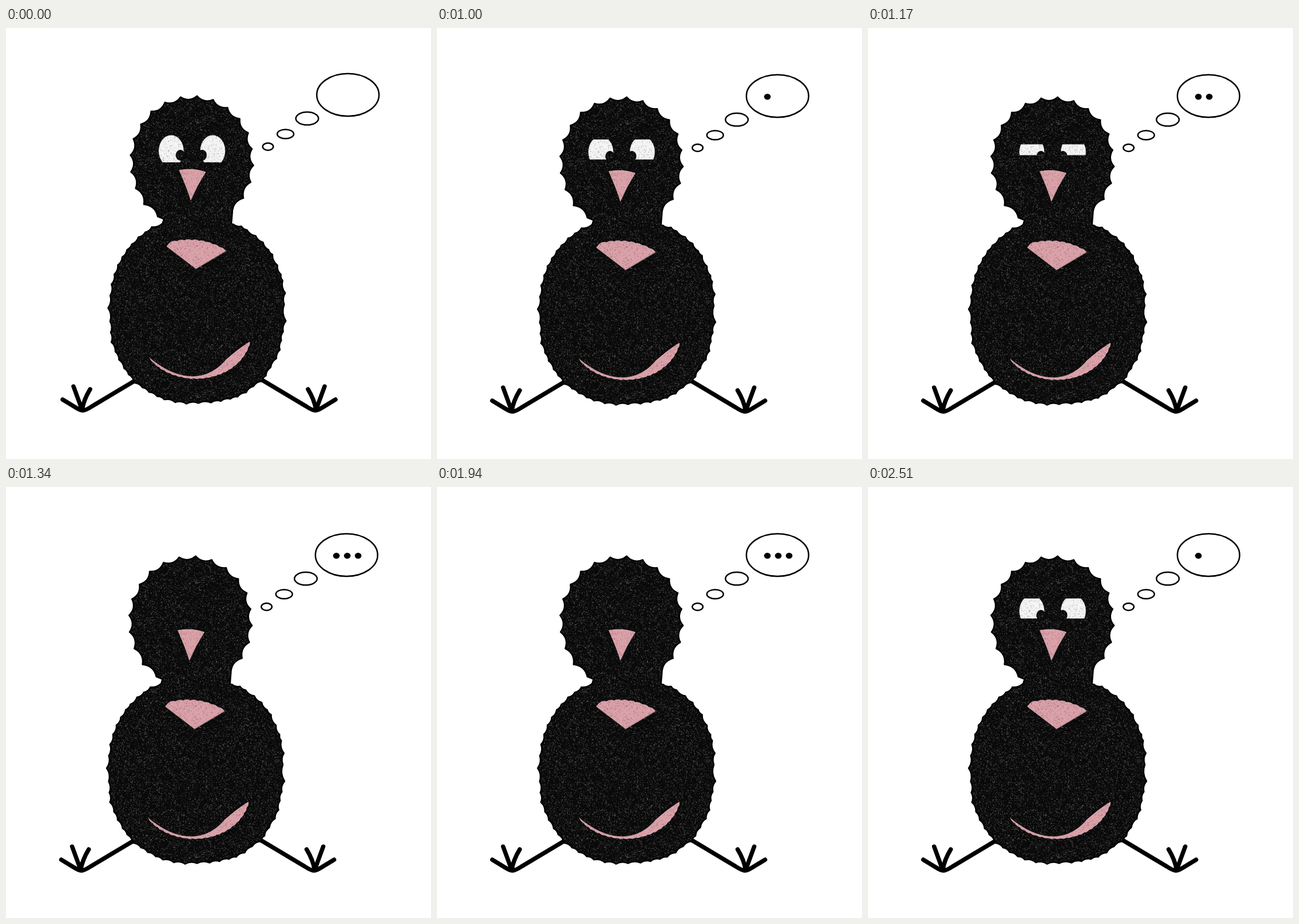
Animation, 743 px wide and 754 px high, one loop 2.68 s. Source, as an HTML page with a canvas:

```html
<!DOCTYPE html>
<html lang="en">
<head>
<meta charset="utf-8">
<title>Blinking chick</title>
<style>
  html, body { margin: 0; width: 100%; height: 100%; overflow: hidden; background: #fff; }
  canvas { display: block; }
</style>
</head>
<body>
<canvas id="stage" width="743" height="754"></canvas>
<script>
const ctx = document.getElementById('stage').getContext('2d');
ctx.imageSmoothingEnabled = false;
ctx.lineCap = ctx.lineJoin = 'round';

// [duration in ms, pose]; pose 0 is awake, pose 3 is asleep
const steps = [[1000, 0], [170, 1], [170, 2], [1000, 3], [170, 2], [170, 1]];
const loop = steps.reduce((sum, [ms]) => sum + ms, 0);

function seeded(seed) {
  return () => (seed = (seed * 16807) % 2147483647) / 2147483647;
}
const random = seeded(4127);
const jitter = amount => (random() * 2 - 1) * amount;

// Follows a clockwise curve in small arcs; a positive bend hollows them, a negative one swells them
function addRagged(path, pointAt, count, bend) {
  let [px, py] = pointAt(0);
  path.lineTo(px, py);
  for (let i = 1; i <= count; i++) {
    const [x, y] = pointAt(i / count);
    path.quadraticCurveTo((x + px) / 2 - (y - py) * bend, (y + py) / 2 + (x - px) * bend, x, y);
    [px, py] = [x, y];
  }
}

const radians = degrees => degrees * Math.PI / 180;

// Round on top, widening towards the neck
function headAt(t) {
  const angle = radians(120 + 294 * t);
  const radius = 107 + 17 * Math.max(0, Math.sin(angle)) ** 1.5 + jitter(1);
  return [325 + radius * Math.cos(angle), 226 + radius * Math.sin(angle)];
}

// A slightly squared ellipse
function bodyAt(t) {
  const angle = radians(-70 + 319 * t + jitter(1.3));
  const square = v => Math.sign(v) * Math.abs(v) ** 0.87;
  const size = 1 + jitter(0.012);
  return [334 + 154 * size * square(Math.cos(angle)), 495 + 162 * size * square(Math.sin(angle))];
}

const cubic = (...points) => t => [0, 1].map(axis => {
  const [a, b, c, d] = points.map(p => p[axis]), s = 1 - t;
  return a * s ** 3 + 3 * b * s * s * t + 3 * c * s * t * t + d * t ** 3;
});

const bird = new Path2D();
addRagged(bird, headAt, 19, 0.36);
bird.lineTo(394, 343);
addRagged(bird, bodyAt, 52, 0.25);
bird.lineTo(276, 334);
bird.closePath();

const beak = new Path2D('M303 249Q326 244 349 252Q334 275 323 301Q317 281 303 249Z');

const chest = new Path2D('M332 421L281 382');
addRagged(chest, cubic([286, 376], [321, 367], [355, 371], [384, 390]), 8, -0.25);
chest.closePath();

const belly = new Path2D('M252 578C300 618 350 622 385 580Q405 562 426 549');
addRagged(belly, cubic([426, 549], [408, 620], [299, 634], [252, 578]), 20, -0.25);

const leg = new Path2D('M232 613L150 662Q141 668 135 669M99 650L122 664Q130 669 135 669' +
  'M118 627L133 668Q136 650 147 632');

function grain(base, speck, strength) {
  const size = 240;
  const tile = document.createElement('canvas');
  tile.width = tile.height = size;
  const t = tile.getContext('2d');
  t.fillStyle = base;
  t.fillRect(0, 0, size, size);
  t.fillStyle = speck;
  for (let i = 0; i < 15000; i++) {
    t.globalAlpha = random() ** 2 * strength;
    t.fillRect(random() * size | 0, random() * size | 0, 1 + random() * 2 | 0, 1 + random() * 2 | 0);
  }
  return ctx.createPattern(tile, 'repeat');
}

const black = grain('#090909', '#808080', 0.38);
const pink = grain('#dca2aa', '#8e6a70', 0.5);
const white = grain('#f5f5f5', '#999', 0.45);

function oval(x, y, rx, ry) {
  ctx.beginPath();
  ctx.ellipse(x, y, rx, ry, 0, 0, Math.PI * 2);
}

// Lid openings per pose: [top, bottom]
const lids = [[180, 235], [193, 228], [201.5, 220.5]];

function drawEye(x, pupilX, pose) {
  const [top, bottom] = lids[pose];
  ctx.save();
  ctx.beginPath();
  ctx.rect(x - 30, top, 60, bottom - top);
  ctx.clip();
  oval(x, 215, 21.8, 27.5);
  ctx.fillStyle = white;
  ctx.fill();
  oval(pupilX, 222.5, 8, 9.5);
  ctx.fillStyle = black;
  ctx.fill();
  ctx.restore();
}

function drawLegs() {
  ctx.strokeStyle = '#000';
  ctx.lineWidth = 7.5;
  ctx.stroke(leg);
  ctx.save();
  ctx.translate(675, 0);
  ctx.scale(-1, 1);
  ctx.stroke(leg);
  ctx.restore();
}

function drawThought(dots) {
  for (const [x, y, rx, ry] of [[597.7, 117, 54.4, 37.3], [526.5, 158.3, 19.8, 11.3],
    [488.6, 185.4, 14.4, 8], [458, 207.6, 9.3, 6.3]]) {
    oval(x, y, rx, ry);
    ctx.stroke();
  }
  ctx.fillStyle = '#000';
  for (let i = 0; i < dots; i++) {
    oval(580 + 19 * i, 118.2, 5.8, 5.3);
    ctx.fill();
  }
}

function draw(pose) {
  ctx.setTransform(1, 0, 0, 1, 0, 0);
  ctx.fillStyle = '#fff';
  ctx.fillRect(0, 0, 743, 754);
  if (pose) ctx.translate(-2.4, 2);

  drawLegs();
  ctx.lineWidth = 2.5;
  ctx.fillStyle = black;
  ctx.fill(bird);
  ctx.stroke(bird);
  drawThought(pose);

  ctx.fillStyle = pink;
  ctx.strokeStyle = '#e5b5bc';
  ctx.lineWidth = 0.7;
  for (const patch of [beak, chest, belly]) {
    ctx.fill(patch);
    ctx.stroke(patch);
  }

  if (pose < 3) {
    drawEye(288.8, 304.8, pose);
    drawEye(361.4, 343, pose);
  }
}

function poseAt(time) {
  for (const [ms, pose] of steps) {
    if (time < ms) return pose;
    time -= ms;
  }
  return 0;
}

const start = performance.now();
let shown = -1;

function tick() {
  const pose = poseAt((performance.now() - start) % loop);
  if (pose !== shown) draw(shown = pose);
  requestAnimationFrame(tick);
}
tick();
</script>
</body>
</html>
```
